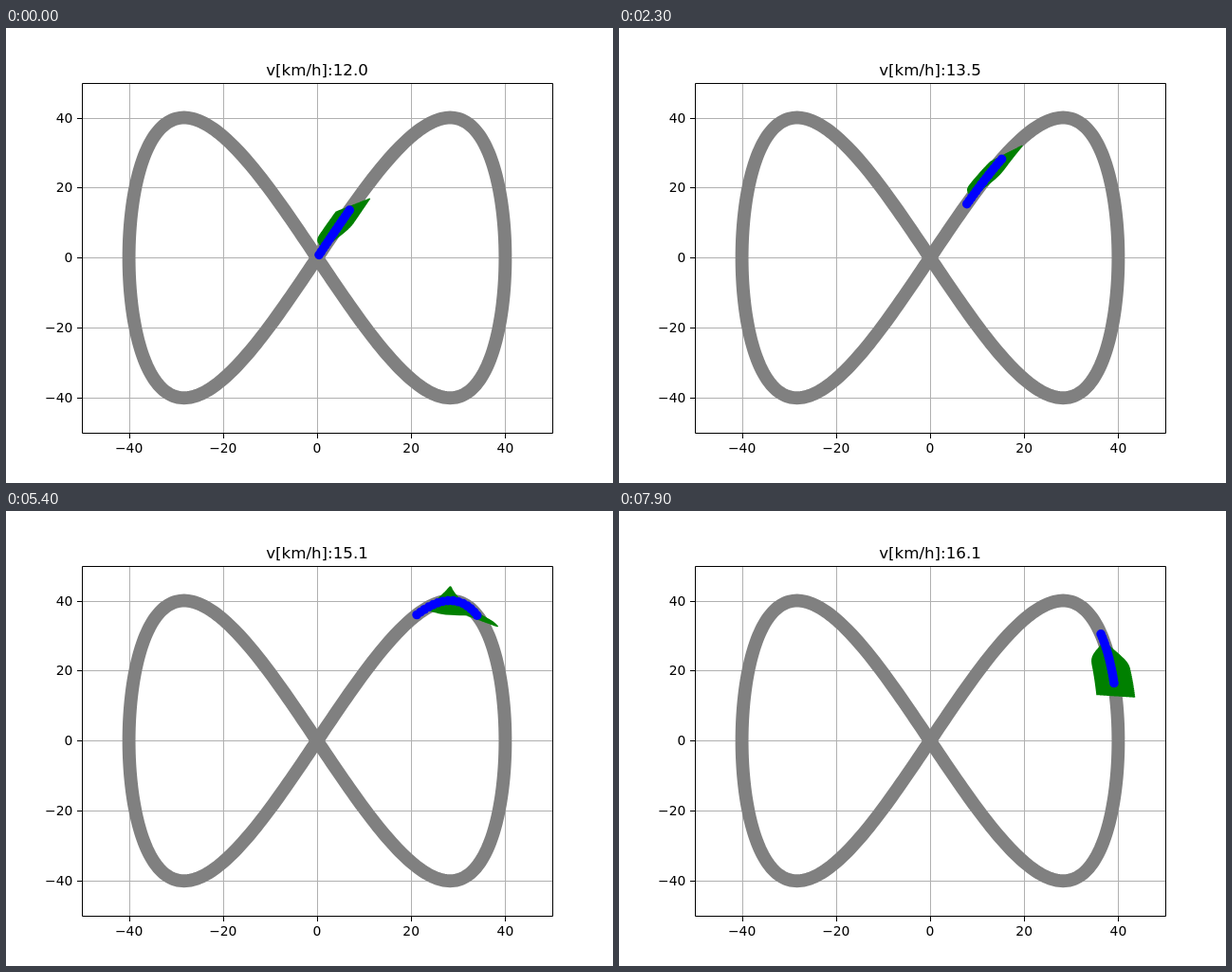
An HTML page with a canvas for the animation above (8000 ms loop, 640x480 px).

```html
<!DOCTYPE html>
<html lang="en">
<head>
<meta charset="utf-8">
<style>
html, body { margin: 0; width: 640px; height: 480px; overflow: hidden; background: #fff; }
canvas { display: block; }
</style>
</head>
<body>
<canvas id="stage" width="640" height="480"></canvas>
<script>
const ctx = document.getElementById('stage').getContext('2d');
const FONT = '"DejaVu Sans", sans-serif';
const TICKS = [-40, -20, 0, 20, 40];
const TARGET = 20, GAIN = 0.0895;      // cruise speed in km/h, approach rate per second
const MAX_OFFSET = 4;                  // lateral reach of the candidates

const px = x => 328 + 4.96 * x;
const py = y => 242.4 - 3.696 * y;

// Course x = 40 sin u, y = 40 sin 2u, with u tabulated by arc length.
const STEP = 0.05;
const byLength = [];
for (let u = 0, s = 0, du = 0.0004; u < 1.8; u += du) {
  while (byLength.length * STEP <= s) byLength.push(u);
  s += 40 * Math.hypot(Math.cos(u), 2 * Math.cos(2 * u)) * du;
}

function coursePoint(s, d = 0) {
  const k = s / STEP, i = Math.floor(k);
  const u = byLength[i] + (byLength[i + 1] - byLength[i]) * (k - i);
  const dx = Math.cos(u), dy = 2 * Math.cos(2 * u), n = Math.hypot(dx, dy);
  return [px(40 * Math.sin(u) + d * dy / n), py(40 * Math.sin(2 * u) + d * dx / n)];
}

const speed = t => TARGET - 8 * Math.exp(-GAIN * t);
// Two simulated seconds pass per second shown.
const travelled = t => 0.9 + 2 / 3.6 * (TARGET * t - 8 * (1 - Math.exp(-GAIN * t)) / GAIN);

const PLAN = [[0, 14.3], [1.6, 14.6], [2.3, 14.8], [3.8, 15.5], [5.4, 15.8], [6.3, 14.7], [7.9, 14.25]];
function planLength(t) {
  const i = Math.max(1, PLAN.findIndex(p => p[0] >= t - 1e-6));
  const [t0, a] = PLAN[i - 1], [t1, b] = PLAN[i];
  return a + (b - a) * (t - t0) / (t1 - t0);
}

const ease = u => u * u * u * (10 - 15 * u + 6 * u * u);

function trace(count, point) {
  for (let i = 0; i <= count; i++) {
    const [x, y] = point(i / count);
    i ? ctx.lineTo(x, y) : ctx.moveTo(x, y);
  }
}

function stroke(color, width, draw) {
  ctx.strokeStyle = color;
  ctx.lineWidth = width;
  ctx.beginPath();
  draw();
  ctx.stroke();
}

function text(str, x, y, size, align) {
  ctx.font = `${size}px ${FONT}`;
  ctx.textAlign = align;
  ctx.fillText(str, x, y);
}

function drawChart() {
  ctx.fillStyle = '#fff';
  ctx.fillRect(0, 0, 640, 480);
  ctx.fillStyle = '#b0b0b0';
  for (const v of TICKS) {
    ctx.fillRect(Math.round(px(v)), 58, 1, 369);
    ctx.fillRect(80, Math.round(py(v)), 496, 1);
  }
  stroke('#808080', 13.89, () => {
    trace(400, k => {
      const u = k * 2 * Math.PI;
      return [px(40 * Math.sin(u)), py(40 * Math.sin(2 * u))];
    });
    ctx.closePath();
  });
}

function drawFrame() {
  stroke('#000', 1, () => ctx.rect(80.5, 58.5, 496, 369));
  ctx.fillStyle = '#000';
  for (const v of TICKS) {
    const x = Math.round(px(v)), y = Math.round(py(v));
    const label = String(v).replace('-', '\u2212');
    ctx.fillRect(x, 428, 1, 5);
    ctx.fillRect(75, y, 5, 1);
    text(label, px(v), 448, 13.89, 'center');
    text(label, 70.3, y + 5, 13.89, 'right');
  }
}

function drawCandidates(t, start) {
  const longest = 3.6 * (speed(t) + TARGET) / 7.2;
  stroke('#008000', 1.5, () => {
    for (let j = 0; j <= 15; j++) {
      const length = longest * (0.55 + 0.03 * j);
      for (let d = -MAX_OFFSET; d <= MAX_OFFSET; d += 0.25) {
        trace(16, k => coursePoint(start + k * length, d * ease(k)));
      }
    }
  });
}

function drawPlan(t, start) {
  const length = planLength(t), count = 14;
  const point = k => coursePoint(start + k * length);
  stroke('#00f', 2.08, () => trace(count, point));
  ctx.fillStyle = '#00f';
  for (let i = 0; i <= count; i++) {
    ctx.beginPath();
    ctx.arc(...point(i / count), 4.86, 0, 2 * Math.PI);
    ctx.fill();
  }
}

function render(t) {
  const start = travelled(t);
  drawChart();
  ctx.lineJoin = 'round';
  drawCandidates(t, start);
  drawPlan(t, start);
  ctx.lineJoin = 'miter';
  drawFrame();
  text('v[km/h]:' + speed(t).toFixed(1), 328, 50, 16.67, 'center');
}

let shown = -1;
const began = performance.now();
function tick() {
  const step = Math.floor((performance.now() - began) % 8000 / 100);
  if (step !== shown) render((shown = step) / 10);
  requestAnimationFrame(tick);
}
tick();
</script>
</body>
</html>
```
